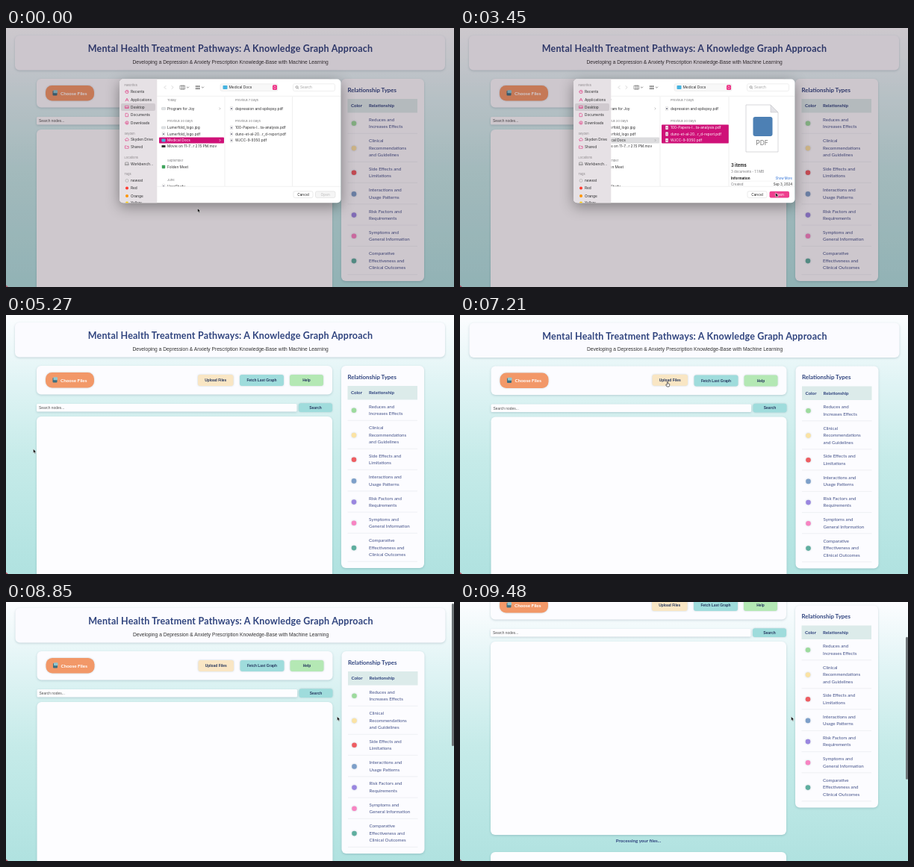
An HTML page that plays this animation: 600x347 px, repeating every 9.51 s.

```html
<!DOCTYPE html>
<html lang="en">
<head>
<meta charset="utf-8">
<title>Knowledge Graph</title>
<style>
html, body { margin: 0; width: 100%; height: 100%; overflow: hidden; background: #fff; }
svg { display: block; width: 100vw; height: 100vh; }
text { white-space: pre; }
.round { font-family: Lato, "Open Sans", sans-serif; }
.arial { font-family: "Liberation Sans", Arial, sans-serif; }
.ui { font-family: Inter, Roboto, sans-serif; }
.b { font-weight: 700; }
.card { filter: drop-shadow(0 1px 1.5px rgba(40, 80, 100, .22)); }
.btn { filter: drop-shadow(0 .6px .8px rgba(40, 80, 100, .25)); }
.sheet { filter: drop-shadow(0 5px 9px rgba(0, 0, 0, .38)); }
.idle .sheet { filter: drop-shadow(0 2px 5px rgba(0, 0, 0, .2)); }
.idle #side, .idle #toolbar { filter: grayscale(1); }
</style>
</head>
<body>
<svg id="stage" viewBox="0 0 600 347" preserveAspectRatio="none"></svg>
<script>
const LOOP = 9510;
const NAVY = '#30447e', PINK = '#cf1178';

const rect = (x, y, w, h, fill, r = 0, extra = '') =>
  `<rect x="${x}" y="${y}" width="${w}" height="${h}" rx="${r}" fill="${fill}" ${extra}/>`;
const dot = (x, y, r, fill, extra = '') =>
  `<circle cx="${x}" cy="${y}" r="${r}" fill="${fill}" ${extra}/>`;
const line = (x1, y1, x2, y2, color, w = .5) =>
  `<path d="M${x1} ${y1}L${x2} ${y2}" stroke="${color}" stroke-width="${w}"/>`;
const stroke = (d, color, w = .6) =>
  `<path d="${d}" fill="none" stroke="${color}" stroke-width="${w}" stroke-linecap="round" stroke-linejoin="round"/>`;
const text = (s, x, y, size, cls, fill, anchor = 'start', extra = '') =>
  `<text x="${x}" y="${y}" font-size="${size}" class="${cls}" fill="${fill}" text-anchor="${anchor}" ${extra}>${s}</text>`;
// interface text placed by its vertical middle
const ui = (s, x, mid, fill = '#2c2c2e', size = 4.8, anchor = 'start', cls = 'ui') =>
  text(s, x, mid + size * .36, size, cls, fill, anchor);
const at = (x, y, body) => `<g transform="translate(${x} ${y})">${body}</g>`;

// ---- web page ----
const RELATIONS = [
  [127.2, '#9ddb9d', 'Reduces and', 'Increases Effects'],
  [160.5, '#fbe3a4', 'Clinical', 'Recommendations', 'and Guidelines'],
  [193.2, '#ee5d62', 'Side Effects and', 'Limitations'],
  [221.8, '#7d9fc9', 'Interactions and', 'Usage Patterns'],
  [250, '#9a86e0', 'Risk Factors and', 'Requirements'],
  [278.2, '#f784c2', 'Symptoms and', 'General Information'],
  [311.5, '#5fae9f', 'Comparative', 'Effectiveness and', 'Clinical Outcomes']
];

function relation([mid, color, ...lines]) {
  const half = lines.length * 4.7 + 4.7;
  return dot(466, mid + .6, 3.3, color, 'class="btn"') +
    lines.map((s, i) =>
      text(s, 486, mid + 2.2 + (i - (lines.length - 1) / 2) * 9.4, 6.2, 'round', '#45538a')).join('') +
    line(457.5, mid + half, 551, mid + half, '#dfe3e8');
}

const button = (label, x, y, w, h, fill, id = '') =>
  `<g class="btn" ${id && `id="${id}"`}>` + rect(x, y, w, h, fill, 3) +
  text(label, x + w / 2, y + h / 2 + 1.7, 4.9, 'arial b', '#26375f', 'middle') + '</g>';

const page = () =>
  '<g class="card">' +
  rect(12, 10, 576, 46.5, '#fbfbff', 6) +
  rect(41, 68, 396, 38.5, '#fcfcff', 6) +
  rect(41, 119, 348.5, 10.5, '#fdfdff', 1.5) +
  rect(41, 136, 396, 259, '#fdfdff', 6) +
  rect(41, 418, 396, 200, '#fdfdff', 6) + '</g>' +
  text('Mental Health Treatment Pathways: A Knowledge Graph Approach', 300.5, 32.4, 12.5, 'round b', NAVY, 'middle', 'letter-spacing=".2"') +
  text('Developing a Depression &amp; Anxiety Prescription Knowledge-Base with Machine Learning', 300.5, 47.6, 6.68, 'arial', '#333', 'middle') +
  '<g class="btn">' + rect(53, 77, 65, 20.5, '#f29868', 8.5) + '</g>' +
  rect(62.5, 84, 6, 6.5, '#3d6f80', 1) + rect(63.5, 83.3, 5.5, 4, '#8fc6d0', .8) +
  text('Choose Files', 73, 89.6, 6.3, 'round b', '#fff') +
  button('Upload Files', 257, 80, 47.5, 15, '#f9e6c4', 'upload') +
  button('Fetch Last Graph', 313, 80, 59, 15, '#9fdcdc') +
  button('Help', 380, 80, 45, 15, '#b4e8b4') +
  text('Search nodes...', 44, 126, 4.9, 'arial', '#555') +
  button('Search', 392, 118.3, 45, 11.7, '#9fdcdc') +
  text('Processing your files...', 239, 405.3, 6.2, 'round b', NAVY, 'middle');

const legend = () =>
  '<g class="card">' + rect(449, 68, 111, 271, '#fcfcff', 6) + '</g>' +
  text('Relationship Types', 457.5, 85.8, 7.9, 'round b', NAVY) +
  rect(457.5, 95, 93.5, 18.5, '#dcebea') +
  text('Color', 462, 106.2, 6.2, 'round b', NAVY) +
  text('Relationship', 486, 106.2, 6.2, 'round b', NAVY) +
  RELATIONS.map(relation).join('');

// ---- file dialog ----
const ICONS = {
  clock: 'M-2.2 0a2.2 2.2 0 1 0 4.4 0a2.2 2.2 0 1 0 -4.4 0M0 -1.3V0H1',
  apps: 'M-2 2L0 -2L2 2M-1.2 .7H1.2',
  screen: 'M-2.2 -1.7H2.2V1.5H-2.2ZM-2.2 .6H2.2',
  doc: 'M-1.6 -2.2H.6L1.6 -1.2V2.2H-1.6Z',
  down: 'M-2.2 0a2.2 2.2 0 1 0 4.4 0a2.2 2.2 0 1 0 -4.4 0M0 -1.2V1.2M-.9 .4L0 1.2L.9 .4',
  cloud: 'M-1.6 1.4H1.6a1.1 1.1 0 0 0 .1 -2.1a1.8 1.8 0 0 0 -3.3 -.2a1.2 1.2 0 0 0 0 2.3Z',
  folder: 'M-2.2 -1.6H-.6L0 -1H2.2V1.7H-2.2Z',
  disk: 'M-1.8 -2H1.8L2.2 1.8H-2.2ZM-2.1 .6H2.1'
};
const PLACES = [
  [85.5, 'Recents', 'clock'], [96, 'Applications', 'apps'], [106, 'Desktop', 'screen'],
  [116.5, 'Documents', 'doc'], [127, 'Downloads', 'down'], [149.5, 'Skyden Drive', 'cloud'],
  [159.5, 'Shared', 'folder'], [182, 'Workbench...', 'disk']
];
const HEADS = [[77, 'Favorites'], [141.5, 'Skyden'], [173.5, 'Locations'], [195.5, 'Tags']];
const TAGS = [[204.5, 'newest', 'none'], [214.5, 'Red', '#ff3b30'], [225, 'Orange', '#ff9500'], [234.5, 'Yellow', '#ffcc00']];

const sidebar = () =>
  rect(154, 101, 46, 10, '#d0cacf', 2) +
  HEADS.map(([y, s]) => ui(s, 158.5, y, '#8b868a', 4)).join('') +
  PLACES.map(([y, s, icon]) =>
    at(162, y, stroke(ICONS[icon], icon === 'disk' ? '#777' : '#e0307c')) + ui(s, 167, y)).join('') +
  TAGS.map(([y, s, c]) =>
    dot(162, y, 2, c, c === 'none' ? 'stroke="#999" stroke-width=".5"' : '') + ui(s, 167, y)).join('');

const chevron = (x, y, color) => stroke(`M${x} ${y - 1.2}L${x + 1.2} ${y}L${x} ${y + 1.2}`, color);
const caret = (x, y) => stroke(`M${x - 1.2} ${y - .6}L${x} ${y + .6}L${x + 1.2} ${y - .6}`, '#555', .7);

const toolbar = () =>
  stroke('M214 77.5L212 79.5L214 81.5M222 77.5L224 79.5L222 81.5', '#c4c4c4', .7) +
  stroke('M233.5 77.2H239.5V82H233.5ZM235.5 77.2V82M237.5 77.2V82', '#555') + caret(243.5, 79.6) +
  [0, 1, 2].map(i => rect(254 + i * 2, 77.2, 1.4, 2, '#666') + rect(254 + i * 2, 80.2, 1.4, 2, '#666')).join('') + caret(263.5, 79.6) +
  rect(287, 74.8, 77, 9.6, '#f8f8f8', 2, 'stroke="#e2e2e2" stroke-width=".5"') +
  rect(290.5, 77, 6, 5, '#45b3e0', .8) +
  ui('Medical Docs', 298.5, 79.6) +
  rect(357, 76.3, 6, 6.6, '#ec2f83', 1.5, 'id="stepper"') +
  stroke('M358.8 79L360 77.8L361.2 79M358.8 80.4L360 81.6L361.2 80.4', '#fff') +
  rect(384.5, 74.8, 56, 9.6, '#fff', 2, 'stroke="#dcdcdc" stroke-width=".5"') +
  dot(389.6, 79.2, 1.5, 'none', 'stroke="#666" stroke-width=".6"') + line(390.7, 80.3, 392, 81.6, '#666', .6) +
  ui('Search', 394, 79.6, '#a0a0a0');

const FOLDER_ROWS = [
  [97, 'Today'], [108, 'Program for Joy', 'pic', 1], [125, 'Previous 30 Days'],
  [133.5, 'Lumerfold_logo.jpg', 'pic'], [142, 'Lumerfold_logo.pdf', 'doc'],
  [150.5, 'Medical Docs', 'folder', 1], [158.5, 'Movie on 11-7...r 2.15 PM.mov', 'film'],
  [178, 'September'], [186, 'Folden Meet', 'app'], [204, 'June'], [211.8, 'UserStudy', 'doc']
];
const FILE_ROWS = [
  [97, 'Previous 7 Days'], [108, 'depression and epilepsy.pdf', 'doc'], [125, 'Previous 30 Days'],
  [133.5, '100-Papers-I...ta-analysis.pdf', 'doc'], [142, 'duno-et-al-20...r_d-report.pdf', 'doc'],
  [150.5, 'WJCC-9-9350.pdf', 'doc']
];
const THUMBS = {
  pic: () => rect(-2.5, -1.6, 5, 3.2, '#dfe3e6', .5, 'stroke="#aaa" stroke-width=".3"'),
  doc: hot => rect(-1.7, -2.4, 3.4, 4.8, '#fff', .4, 'stroke="#aaa" stroke-width=".3"') + rect(-.9, -.8, 1.8, 1.8, hot ? '#e78bbb' : '#778'),
  folder: () => rect(-2.5, -2, 5, 4, '#45b3e0', .7),
  film: () => rect(-2.5, -1.6, 5, 3.2, '#333', .3),
  app: () => rect(-2.2, -2.2, 4.4, 4.4, '#3fa45b', .8)
};

const rows = (list, x, isHot) => list.map(([y, s, kind, open]) => {
  if (!kind) return ui(s, x, y, '#77777a', 4.1);
  const hot = isHot(s, y), ink = hot ? '#fff' : '#2c2c2e';
  return at(x - 5, y, THUMBS[kind](hot)) + ui(s, x, y, ink) +
    (open ? chevron(x + 70, y, hot ? '#fff' : '#999') : '');
}).join('');

// step 0: folder chosen, 1: one file, 2: three files, 3: inactive window
function columns(step) {
  const mark = step === 3 ? '#d3d3d5' : PINK;
  return rect(205, 146.4, 87, 8.2, step ? '#dcdcde' : PINK, 1) +
    (step ? rect(295, 129.4, 90, step === 1 ? 8.3 : 25.2, mark, 1) : '') +
    rows(FOLDER_ROWS, 216, s => !step && s === 'Medical Docs') +
    rows(FILE_ROWS, 307, (s, y) => (step === 1 && y === 133.5) || (step === 2 && y > 130)) +
    line(293, 92, 293, 212, '#dedede') + line(step ? 385 : 383.5, 92, step ? 385 : 383.5, 212, '#dedede');
}

const info = step =>
  ui(step === 1 ? '1 item' : '3 items', 363, 184, '#222', 5.8, 'start', 'ui b') +
  ui(step === 1 ? '1 document - 0.4 MB' : '3 documents - 1.1 MB', 363, 192, '#77777a', 4.4) +
  ui('Information', 363, 201.3, '#222', 4.5, 'start', 'ui b') +
  ui('Show More', 445, 201.3, '#2b6fd6', 4.2, 'end') +
  line(363, 205.2, 445, 205.2, '#e6e6e6', .4) +
  ui('Created', 363, 209.6, '#77777a', 4.4) +
  ui('Sep 3, 2024', 445, 209.6, '#222', 4.4, 'end');

const preview =
  '<path d="M383 103H416L426 113V166H383Z" fill="#fff" stroke="#c8c8cc" stroke-width=".7"/>' +
  '<path d="M416 103V113H426Z" fill="#e4e4e8" stroke="#c8c8cc" stroke-width=".6"/>' +
  rect(392.5, 119, 26, 26, '#4d80b4', 3) +
  ui('PDF', 404.5, 154, '#777', 8.5, 'middle');

const spinner = Array.from({ length: 12 }, (_, i) =>
  `<path d="M0 -3V-5.8" stroke="#333" stroke-width="1" stroke-linecap="round" opacity="${.15 + i * .07}" transform="rotate(${i * 30})"/>`).join('');

function footer(step) {
  const lit = step === 1 || step === 2;
  const edge = 'stroke="#d4d4d4" stroke-width=".5"';
  return rect(385, 218.8, 26, 8.6, '#fff', 2, edge) + ui('Cancel', 398, 223.1, '#222', 4.8, 'middle') +
    rect(414.5, 218.8, 26.5, 8.6, lit ? '#ee3f8e' : step ? '#fff' : '#f5f5f5', 2, lit ? '' : edge) +
    ui('Open', 427.7, 223.1, lit ? '#fff' : step ? '#222' : '#bbb', 4.8, 'middle');
}

const dialog = () =>
  '<g class="sheet">' + rect(152, 68.5, 296.5, 165.8, '#fff', 5) + '</g>' +
  '<g clip-path="url(#sheetClip)">' + rect(152, 68, 50.3, 167, '#e6e1e5', 0, 'id="sideBack"') +
  `<g id="side">${sidebar()}</g></g>` +
  `<g id="toolbar">${toolbar()}</g>` + line(202.3, 91.3, 448, 91.3, '#e2e2e2') +
  '<g clip-path="url(#listClip)"><g id="cols"></g><g id="info"></g>' +
  `<g id="preview">${preview}</g><g id="spin">${spinner}</g></g>` +
  line(202.3, 212.3, 448, 212.3, '#e2e2e2') + '<g id="foot"></g>';

const ARROW = '<path d="M0 0V5.4L1.3 4.3L2.2 6.2L3.1 5.8L2.3 4H4Z" fill="#111" stroke="#fff" stroke-width=".4"/>';
const HAND = '<path d="M-.7 -2.2Q0 -3 .6 -2.2V0L2.6 .5Q3 1 2.6 2.4L2 4H-.9L-2.4 1.5Q-2.2 .6 -.7 1.6Z" fill="#fff" stroke="#111" stroke-width=".6" stroke-linejoin="round"/>';

document.getElementById('stage').innerHTML = `<defs>
  <linearGradient id="sky" gradientUnits="userSpaceOnUse" x1="0" y1="0" x2="0" y2="347">
    <stop offset="0" stop-color="#fcfdff"/><stop offset=".25" stop-color="#e1f4f5"/>
    <stop offset=".55" stop-color="#c6ebe9"/><stop offset="1" stop-color="#b0e2e0"/></linearGradient>
  <clipPath id="sheetClip">${rect(152, 68.5, 296.5, 165.8, '#000', 5)}</clipPath>
  <clipPath id="listClip">${rect(202.5, 91.5, 246, 120.7, '#000')}</clipPath></defs>
  ${rect(0, 0, 600, 347, 'url(#sky)')}
  <g id="page">${page()}</g>
  <g id="legend">${legend()}</g>
  <rect id="dim" width="600" height="347" fill="#280a1e"/>
  <g id="dialog">${dialog()}</g>
  <rect id="bar" x="597" width="3" height="191" rx="1.5" fill="#6d7376"/>
  <path d="M0 347V344.5L3 347Z" fill="#b0566a"/>
  <g id="cursor"><g id="arrow">${ARROW}</g><g id="hand">${HAND}</g></g>`;

// ---- motion: [time, value, ...] tables ----
const CURSOR = [
  [0, 256.5, 241.5], [120, 256.5, 241.5], [640, 326, 133], [820, 326, 133], [1120, 328, 150],
  [1330, 328, 150], [1850, 421.5, 220], [3330, 421.5, 220], [3800, 428.5, 224], [4300, 428.5, 224],
  [5150, 36.5, 179.5], [5600, 36.5, 179.5], [6900, 278, 92], [7750, 278, 92], [8500, 443.5, 153.5]
];
const DIM = [[4060, .22], [4180, .1], [4350, 0]];
const FADE = [[4080, 1], [4180, .76], [4330, 0]];
const LIFT = [[4080, 0], [4180, -6], [4330, -14]];
const SIDE = [[4080, 1], [4180, .45]];
const SLIDE = [[720, 0], [960, -25]];
const SCROLL = [[5300, 0], [7210, -.5], [8780, -.5], [8850, 2], [9480, 83]];
const NUDGE = [[5300, 0], [7210, .5], [8850, .5], [9480, 0]];
const STICK = 63.5; // the legend stays put after this much scrolling

const smooth = k => k * k * (3 - 2 * k);
function value(table, t, ease = smooth) {
  const next = table.findIndex(row => row[0] > t);
  if (next < 0) return table[table.length - 1].slice(1);
  if (!next) return table[0].slice(1);
  const a = table[next - 1], b = table[next];
  const k = ease((t - a[0]) / (b[0] - a[0]));
  return a.slice(1).map((v, i) => v + (b[i + 1] - v) * k);
}

const $ = id => document.getElementById(id);
const set = (id, name, v) => $(id).setAttribute(name, v);
const show = (id, on) => set(id, 'visibility', on ? 'inherit' : 'hidden');
const move = (id, x, y) => set(id, 'transform', `translate(${x} ${y})`);

let shown = -1;
function setStep(step) {
  if (step === shown) return;
  shown = step;
  $('cols').innerHTML = columns(step);
  $('info').innerHTML = step ? info(step) : '';
  $('foot').innerHTML = footer(step);
  set('dialog', 'class', step === 3 ? 'idle' : '');
  set('stepper', 'fill', step === 3 ? '#b5b5b8' : '#ec2f83');
  set('sideBack', 'fill', step === 3 ? '#d6d3d5' : '#e6e1e5');
}

function draw(t) {
  setStep(t < 720 ? 0 : t < 1220 ? 1 : t < 4060 ? 2 : 3);
  const [scroll] = value(SCROLL, t), [nudge] = value(NUDGE, t);
  move('page', nudge, -scroll);
  move('legend', nudge, -Math.min(scroll, STICK));
  set('dim', 'opacity', value(DIM, t)[0]);
  set('dialog', 'opacity', value(FADE, t)[0]);
  show('dialog', t < 4330);
  move('dialog', 0, value(LIFT, t)[0]);
  set('side', 'opacity', value(SIDE, t)[0]);
  move('cols', value(SLIDE, t)[0], 0);
  show('spin', t >= 960 && t < 2920);
  show('preview', t >= 2920);
  set('spin', 'transform', `translate(404 133) rotate(${Math.floor(t / 80) * 30})`);
  show('bar', t >= 8790);
  set('bar', 'y', 1 + Math.max(0, scroll) * .55);
  const [x, y] = value(CURSOR, t);
  const over = x > 257 && x < 304 && y > 80 && y < 95.5 && t > 6000;
  show('hand', over);
  show('arrow', !over);
  move('cursor', x, y);
  move('upload', 0, over ? -.8 : 0);
}

const start = performance.now();
function tick() {
  draw((performance.now() - start) % LOOP);
  requestAnimationFrame(tick);
}
tick();
</script>
</body>
</html>
```
